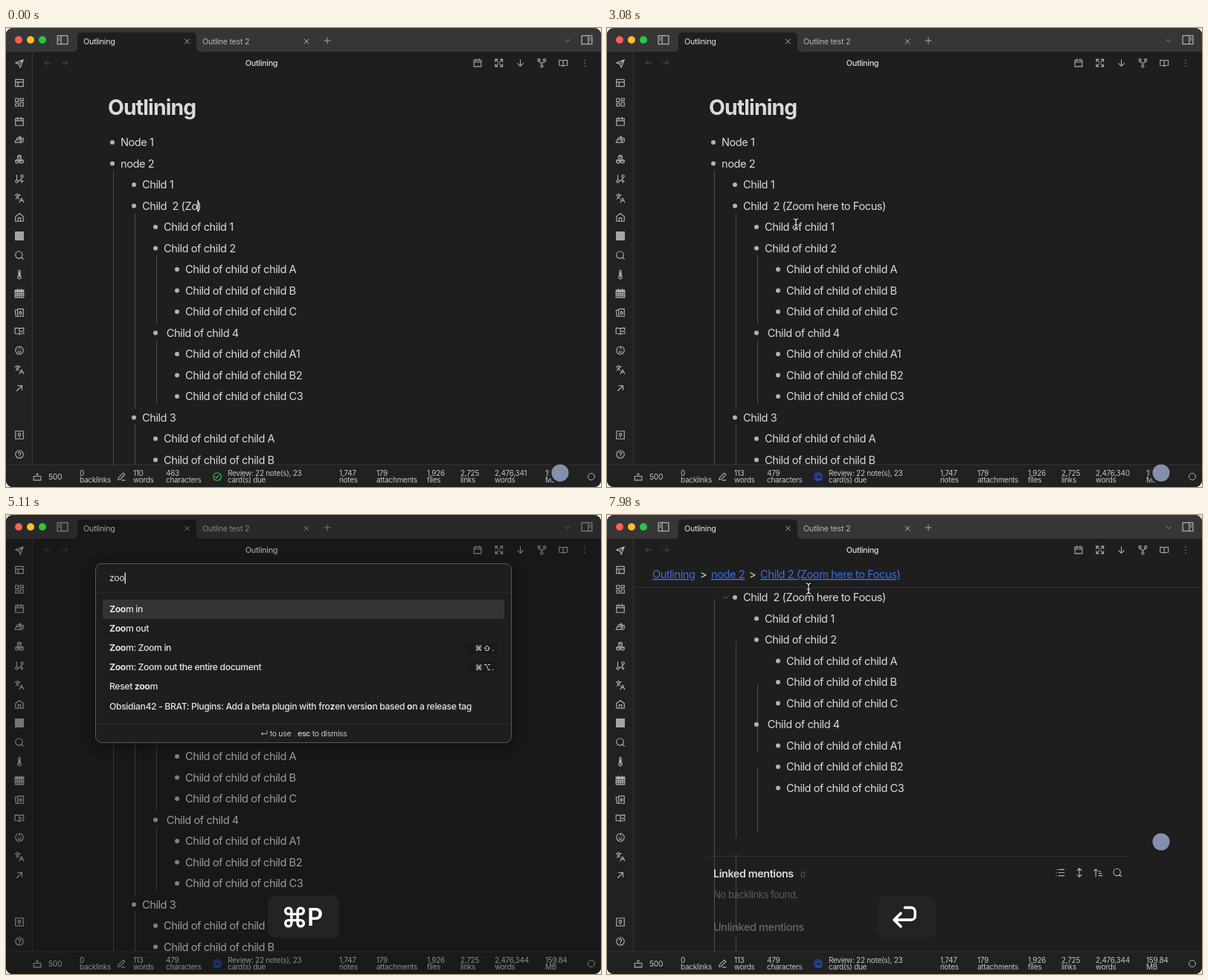
Recreate the animation shown at these times as an HTML page. Size 800 by 618 pixels, loop 8 s.

```html
<!DOCTYPE html>
<html lang="en">
<head>
<meta charset="utf-8">
<title>Outlining</title>
<style>
html, body { margin: 0; width: 100%; height: 100%; overflow: hidden; background: #eee; }
svg { display: block; width: 800px; height: 618px; }
text { font-family: Inter, "DejaVu Sans", sans-serif; letter-spacing: -.03em; white-space: pre; }
.icon { fill: none; stroke-linecap: round; stroke-linejoin: round; }
.modal { filter: drop-shadow(0 4px 8px rgba(0, 0, 0, .4)); }
.list text { font-weight: 500; }
</style>
</head>
<body>
<svg viewBox="0 0 800 618">
  <defs>
    <clipPath id="window"><rect width="800" height="618" rx="9"/></clipPath>
    <clipPath id="page"><rect x="36" y="60" width="764" height="528"/></clipPath>
    <clipPath id="list"><rect x="121" y="106" width="558" height="365"/></clipPath>
  </defs>
  <g id="back" clip-path="url(#window)"></g>
  <g id="stage" clip-path="url(#window)"></g>
</svg>
<script>
const LOOP = 8000, OPEN = 4690, ENTER = 7140;
const $ = id => document.getElementById(id);

// Icon outlines on a 24 unit grid
const disc = 'M21 12a9 9 0 1 1-18 0 9 9 0 0 1 18 0';
const book = 'M12 20V7c-2-2-5-2-10-2v13c5 0 8 0 10 2 2-2 4-2 10-2';
const icons = {
  send: 'M21 3 3 10l8 3 3 8zM21 3 11 13',
  layout: 'M3 4h18v16H3zM3 10h18M9 10v10',
  grid: 'M3 3h7v8H3zM14 3h7v5h-7zM14 12h7v9h-7zM3 15h7v6H3z',
  cal: 'M3 5h18v16H3zM3 10h18M8 2v5M16 2v5',
  hand: 'M2 18l5-9 8-4-4 7-4 1M2 19h17M14 17V9h7v8M17 10v6',
  boxes: 'M12 2l4 2v5l-4 2-4-2V4zM7 12l4 2v5l-4 2-4-2v-5zM17 12l4 2v5l-4 2-4-2v-5zM8 4l4 2 4-2M3 14l4 2 4-2M13 14l4 2 4-2',
  branch: 'M6 3v12M9 18a3 3 0 1 1-6 0 3 3 0 0 1 6 0M18 9a3 3 0 1 0 0-6 3 3 0 0 0 0 6c0 5-4 6-9 8M18 15v6M15 18h6',
  lang: 'M2 5h12M7 2h1M5 8l6 6M4 14l6-6 2-3M22 22l-5-10-5 10M14 18h6',
  home: 'M3 10l9-7 9 7v11H3zM9 21v-8h6v8',
  search: 'M19 11a8 8 0 1 1-16 0 8 8 0 0 1 16 0M21 21l-4-4',
  thermo: 'M14 14.5V4a2 2 0 0 0-4 0v10.5a4 4 0 1 0 4 0zM12 8v10',
  month: 'M2 5h20v17H2zM2 7h20M2 9h20M8 2v4M16 2v4M2 13h20M2 17h20M7 9v13M12 9v13M17 9v13',
  cards: 'M8 4h13v17H8zM8 6l-6 1 2 14h4M14.5 9l3 4-3 4-3-4z',
  check: book + 'v-4M12 7c2-2 5-2 10-2v4M15 12l2 2 5-4',
  face: disc + 'M9 11h.1M15 11h.1M9 15q3 3 6 0M12 3q3 3 0 4',
  out: 'M6 18 18 6M8 6h10v10',
  vault: 'M3 3h18v18H3zM12 8a3 3 0 1 1 0 6 3 3 0 0 1 0-6M12 14v3',
  help: disc + 'M9 9a3 3 0 1 1 3 4v1M12 17h.1',
  expand: 'M14 10l7-7M15 3h6v6M10 14l-7 7M3 15v6h6M3 9V3h6M3 3l7 7M21 15v6h-6M21 21l-7-7',
  down: 'M12 4v16M5 13l7 7 7-7',
  left: 'M20 12H4M11 5l-7 7 7 7',
  right: 'M4 12h16M13 5l7 7-7 7',
  fork: 'M8 5a3 3 0 1 1-6 0 3 3 0 0 1 6 0M22 5a3 3 0 1 1-6 0 3 3 0 0 1 6 0M15 20a3 3 0 1 1-6 0 3 3 0 0 1 6 0M5 8q0 4 7 4t7-4M12 12v5',
  book: book + 'V5c-6 0-8 0-10 2',
  more: 'M12 4v1M12 11.5v1M12 19v1',
  cross: 'M5 5l14 14M19 5 5 19',
  plus: 'M12 3v18M3 12h18',
  chevron: 'M4 8l8 8 8-8',
  panel: 'M1 3h22v18H1zM9 3v18M4 8h2M4 12h2',
  panelR: 'M1 3h22v18H1zM15 3v18M18 8h2M18 12h2',
  bot: 'M3 11h18v10H3zM12 11V5M9 5h6M8 16h.1M16 16h.1',
  pencil: 'M4 20l1-5L17 3l4 4L9 19zM13 21h8',
  ok: disc + 'M8 12l3 3 5-6',
  sync: disc + 'M8 11a4 4 0 0 1 8 0M16 14a4 4 0 0 1-8 0',
  ring: disc,
  pin: 'M12 17v5M5 17h14l-3-6V4h1V2H7v2h1v7z',
  list: 'M8 5h13M8 12h13M8 19h13M3 5h.1M3 12h.1M3 19h.1',
  updown: 'M12 2v20M7 7l5-5 5 5M7 17l5 5 5-5',
  sort: 'M6 21V4M2 8l4-4 4 4M13 9h4M13 14h6M13 19h8',
  command: 'M18 3a3 3 0 0 0-3 3v12a3 3 0 1 0 3-3H6a3 3 0 1 0 3 3V6a3 3 0 1 0-3 3h12a3 3 0 0 0 0-6z',
  enter: 'M12 3h6a4 4 0 0 1 4 4v4a4 4 0 0 1-4 4H2M8 8.5l-6.5 6.5 6.5 6.5'
};

const icon = (name, x, y, size = 14, color = '#b0b0b0', weight = 2) =>
  `<path class="icon" stroke="${color}" stroke-width="${weight}" d="${icons[name]}" ` +
  `transform="translate(${x - size / 2} ${y - size / 2}) scale(${size / 24})"/>`;
const text = (s, x, y, size = 14.6, color = '#dadada', extra = '') =>
  `<text x="${x}" y="${y}" font-size="${size}" fill="${color}" ${extra}>${s}</text>`;
const rect = (x, y, w, h, fill, extra = '') =>
  `<rect x="${x}" y="${y}" width="${w}" height="${h}" fill="${fill}" ${extra}/>`;
const circle = (x, y, r, fill) => `<circle cx="${x}" cy="${y}" r="${r}" fill="${fill}"/>`;
const bold = s => s.replace(/\*(.+?)\*/g, '<tspan font-weight="700">$1</tspan>');
const bar = (x, y, h) => rect(x, y, 1.3, h, '#eee');

function chrome() {
  const side = { send: 48, layout: 74, grid: 100, cal: 126, hand: 150, boxes: 177, branch: 203, lang: 229,
    home: 255, search: 306, thermo: 332, month: 357, cards: 383, check: 408, face: 434, out: 485, vault: 548, help: 574 };
  const head = ['cal', 'expand', 'down', 'fork', 'book', 'more'];
  return rect(0, 0, 800, 618, '#1e1e1e') + rect(0, 32, 35, 586, '#212121') + rect(0, 588, 800, 30, '#212121') +
    rect(0, 0, 800, 32, '#363636') + rect(35, 32, 1, 556, '#363636') + rect(0, 587.5, 800, 1, '#363636') +
    '<path d="M90 32q6 0 6-6V12q0-6 6-6h148q6 0 6 6v14q0 6 6 6z" fill="#1e1e1e"/>' +
    icon('panel', 76, 16, 15) + icon('panelR', 781, 16, 15) + icon('chevron', 755, 17, 9) +
    icon('cross', 243.5, 18, 10, '#ccc') + icon('cross', 404, 18, 10, '#ccc') + icon('plus', 432, 17, 11) +
    text('Outlining', 104, 22, 10.8, '#e2e2e2') + text('Outline test 2', 264, 22, 10.8, '#b3b3b3') +
    text('Outlining', 343.5, 51, 10.8, '#dadada', 'font-weight="500" text-anchor="middle"') +
    icon('left', 56, 47, 11, '#555') + icon('right', 79, 47, 11, '#555') +
    head.map((n, i) => icon(n, 634 + 28.8 * i, 47, 13)).join('') +
    Object.entries(side).map(([n, y]) => icon(n, 18, y)).join('') + icon('lang', 18, 460) +
    rect(12, 274, 12, 12, '#a5a5a5');
}

const lights = ['#ff5f57', '#febc2e', '#28c840'].map((c, i) => circle(17 + 16 * i, 16, 5, c)).join('');

// One outline row per entry: depth, then text
const rows = ['0Node 1', '0node 2', '1Child 1', '1Child  2 (', '2Child of child 1', '2Child of child 2',
  '3Child of child of child A', '3Child of child of child B', '3Child of child of child C', '2 Child of child 4',
  '3Child of child of child A1', '3Child of child of child B2', '3Child of child of child C3',
  '1Child 3', '2Child of child of child A', '2Child of child of child B'];

const outline = (list, top, typed) => list.map((row, i) => {
  const depth = +row[0], y = top + 28.5 * i, isTyped = row.endsWith('(');
  const s = row.slice(1) + (isTyped ? typed + ')' : '');
  return circle(143 + 29 * depth, y, 3, '#b3b3b3') +
    text(s, 154 + 29 * depth, y + 5.2, 14.6, '#dadada', isTyped ? 'id="typed"' : '');
}).join('');
const guides = list => list.map(([x, a, b]) => rect(x, a, 1, b - a, '#4c4c4c')).join('');

const fullPage = typed => text('Outlining', 137, 116.5, 28.3, '#dadada', 'font-weight="700"') +
  guides([[144, 192, 588], [173, 250, 513], [173, 534, 588], [202, 306, 398], [202, 420, 506]]) +
  outline(rows, 154, typed);

function zoomedPage(typed) {
  const link = (s, x) => text(s, x, 85, 14.6, '#3a70e0', 'text-decoration="underline"');
  return link('Outlining', 61) + text('&gt;', 125, 85) + link('node 2', 140) + text('&gt;', 191, 85) +
    link('Child 2 (Zoom here to Focus)', 206) + rect(36, 97, 764, 1, '#363636') +
    guides([[144, 113, 588], [173, 171, 434], [173, 456, 560], [173, 569, 588], [202, 228, 320], [202, 341, 427]]) +
    icon('chevron', 160, 111, 9, '#888') + outline(rows.slice(3, 13), 111, typed) +
    rect(138, 459, 562, 1, '#363636') +
    text('Linked mentions', 143, 488, 14.4, '#dadada', 'font-weight="600"') + text('0', 260, 488, 11, '#666') +
    ['list', 'updown', 'sort', 'search'].map((n, i) => icon(n, 609.5 + 25.6 * i, 481.5)).join('') +
    text('No backlinks found.', 143, 515.5, 12.9, '#5c5c5c') +
    text('Unlinked mentions', 143, 560, 14.6, '#666', 'font-weight="500"');
}

function status(t, count, typed) {
  const words = 109 + typed.trim().split(' ').length;
  const total = t < 1050 ? 341 : t < 4900 ? 340 : 344;
  const cells = [[99, 0, 'backlinks'], [171, words, 'words'], [215, 463 + count, 'characters'],
    [298, 'Review: 22 note(s), 23', 'card(s) due'], [448, '1,747', 'notes'], [498, 179, 'attachments'],
    [566, '1,926', 'files'], [611, '2,725', 'links'], [657, '2,476,' + total, 'words'], [725, '159.84', 'MB']];
  return icon('bot', 42, 604, 13) + text('500', 57, 607.5, 10.3, '#c4c4c4') + icon('pencil', 155, 604, 13) +
    (t < 2200 ? icon('ok', 284, 604, 14, '#35c35c') : icon('sync', 284, 604, 14, '#2060e8')) +
    icon('ring', 787, 604, 12) +
    cells.map(([x, a, b]) => text(a, x, 602.5, 10, '#c4c4c4') + text(b, x, 611.8, 10, '#c4c4c4')).join('');
}

// Command name, then its shortcut
const commands = [['Quick switcher: Open quick switcher', '⌘O'], ['Close current tab', '⌘W'], ['Close all other tabs'],
  ['Delete current file'], ['Templater: Create new note from template', '⌘⇧T'],
  ['Templater: Open Insert Template modal', '⌘I'], ['Obsidian42 - BRAT: All Commands list', '⌘⇧A'],
  ['Create new note', '⌘N'], ['Create note to the right', '⌘⇧N'], ['Split right', '⌘⇧R'], ['Split down', '⌘⇧D'],
  ['Spaced Repetition: Review note as easy'], ['Spaced Repetition: Review note as good'],
  ['Spaced Repetition: Review note as hard']];
const matches = [['Zoom in'], ['Zoom out'], ['Zoom: Zoom in', '⌘⇧.'], ['Zoom: Zoom out the entire document', '⌘⌥.'],
  ['Reset zoom'],
  ['Obsidian42 - BRAT: Plugins: Add a beta plugin with fro*z*en versi*o*n based *o*n a release tag']];

function palette(t) {
  const query = 'zoom'.slice(0, [4900, 4990, 5080, 5360].filter(at => t >= at).length);
  const n = query.length;
  const items = n ? matches.slice(0, n < 4 ? 6 : 5) : commands;
  const bottom = n ? (n < 4 ? 307 : 281) : 497;
  const chosen = t < 5600 ? 0 : t < 5740 ? 1 : 2;
  const caretOn = t < 5360 || Math.floor((t - 5360) / 500) % 2 === 0;
  const right = n ? 656 : 630;
  const list = items.map(([name, keys = ''], i) => {
    const y = 127 + 26.1 * i, wide = 11.5 * keys.length + 4;
    const label = n && !name.includes('*') ? name.replace(new RegExp(query, 'i'), '*$&*') : name;
    return (i === chosen ? rect(130, y - 13, 540, 26, '#333', 'rx="3"') : '') +
      text(bold(label), 139, y + 4, 12.2, '#e2e2e2') +
      (keys && rect(right - wide + 1, y - 7.5, wide + 3, 15, '#1a1a1a', 'rx="3"') +
        text([...keys].join('\u2009'), right, y + 3.5, 10, '#dadada', 'text-anchor="end"')) +
      (n ? '' : icon('pin', 651, y, 13, '#ccc'));
  }).join('');
  return rect(0, 0, 800, 618, 'rgba(10,10,10,.3)') +
    rect(120.5, 65.5, 559, bottom - 66, '#1e1e1e', 'rx="8" stroke="#5a5a5a" class="modal"') +
    rect(121, 104, 558, 1, '#2b2b2b') +
    (n ? text(query, 139, 89, 12.2, '#dadada', 'id="query"') : text('Select a command...', 139, 89, 12.2, '#666')) +
    (caretOn ? '<g id="queryCaret"></g>' : '') +
    `<g class="list" clip-path="url(#list)">${list}</g>` + rect(121, bottom - 26, 558, 1, '#2b2b2b') +
    text('↵ to use', 342, bottom - 9.5, 10.5, '#c4c4c4') +
    text('<tspan font-weight="600">esc</tspan> to dismiss', 392, bottom - 9.5, 10.5, '#c4c4c4');
}

function keyCap(t) {
  const box = (x, y, w, h) => rect(x, y, w, h, '#232323', 'rx="10"');
  if (t < OPEN) return '';
  if (t < 5600) return box(352, 512.5, 96, 57) + icon('command', 388, 541.5, 33, '#fff', 2.5) +
    text('P', 405, 553, 33, '#fff', 'font-weight="600"');
  if (t < ENTER) return box(370, 516, 61, 50) + icon('down', 400, 542, 31, '#fff', 2.8);
  return box(364, 512.5, 78.5, 57) + icon('enter', 400.5, 541, 33, '#fff', 2.6);
}

function pointer(t) {
  const glide = (from, to, start, span) => {
    const p = Math.min(1, (t - start) / span), e = p * (2 - p);
    return from.map((v, i) => v + (to[i] - v) * e);
  };
  const beam = ([x, y]) => {
    const d = `M${x - 3} ${y - 7}q3 0 3 3v8q0 3-3 3M${x + 3} ${y - 7}q-3 0-3 3v8q0 3 3 3M${x - 2} ${y + 1}h4`;
    return `<path class="icon" d="${d}" stroke="#111" stroke-width="3"/><path class="icon" d="${d}" stroke="#eee" stroke-width="1.2"/>`;
  };
  if (t >= 2730 && t < OPEN) return beam(glide([285, 320], [254, 264], 2730, 330));
  if (t >= OPEN && t < 4900) return '<path d="M254 251v12l3-2.5 2 4.5 2-1-2-4.3h4z" fill="#111" stroke="#eee"/>';
  if (t >= 7630) return beam(glide([254, 257], [271, 99], 7630, 320));
  return '';
}

// Letters added so far after "Zo"
function lettersAt(t) {
  if (t < 880) return Math.max(0, Math.floor((t - 90) / 105) + 1);
  if (t < 1045) return 9;
  return t < 1195 ? 10 : Math.min(16, 11 + Math.floor((t - 1195) / 75));
}

let shown = '';
function frame() {
  const t = performance.now() % LOOP;
  const count = lettersAt(t), typed = 'Zoom here to Focus'.slice(0, count + 2);
  const zoomed = t >= ENTER, open = t >= OPEN && !zoomed;
  const caretOn = t < OPEN && (t < 2070 || Math.floor((t - 1570) / 500) % 2 === 0);
  const badgeAt = (y, halo) => circle(745, y, 15, halo) + circle(745, y, 11.5, '#8490ab');
  const badge = t < 4900 ? badgeAt(599, open ? '#1a1a1a' : '#212121') : zoomed ? badgeAt(440, '#1e1e1e') : '';
  const html = `<g clip-path="url(#page)">${zoomed ? zoomedPage(typed) : fullPage(typed)}</g>` +
    (caretOn ? '<g id="caret"></g>' : '') + status(t, count, typed) +
    (open ? palette(t) : '') + lights + badge + keyCap(t) + pointer(t);
  if (html !== shown) {
    $('stage').innerHTML = shown = html;
    if ($('caret')) $('caret').innerHTML = bar(183 + $('typed').getSubStringLength(0, 10 + typed.length), 231.5, 16);
    if ($('queryCaret')) $('queryCaret').innerHTML = bar(139.5 + ($('query') ? $('query').getComputedTextLength() : 0), 77.5, 15);
  }
  requestAnimationFrame(frame);
}

$('back').innerHTML = chrome();
frame();
</script>
</body>
</html>
```
